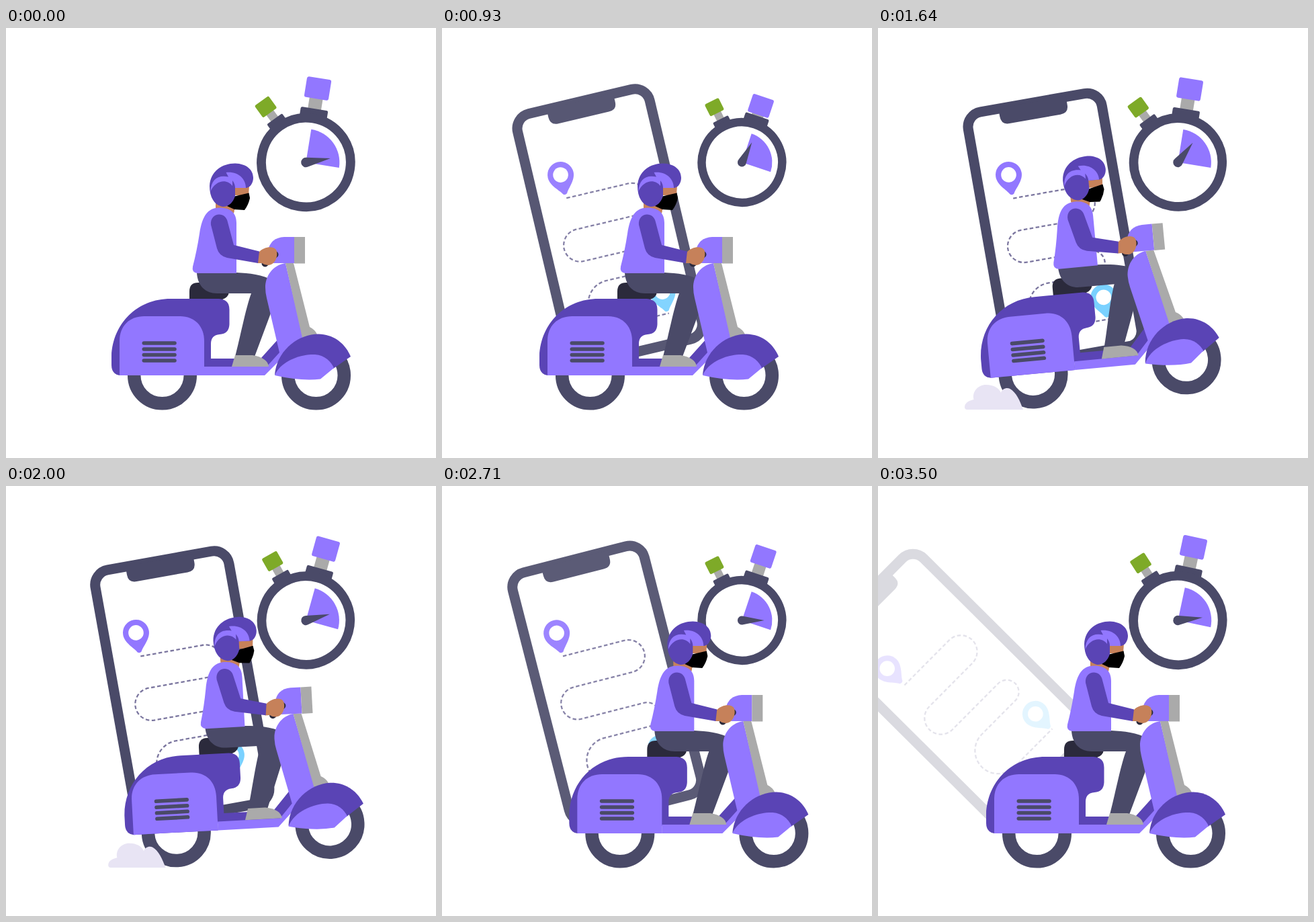
Write an HTML page that moves like this. It is 640 by 640 pixels and loops after 3.57 s.

```html
<!DOCTYPE html>
<html lang="en">
<head>
<meta charset="utf-8">
<title>Express delivery</title>
<style>
  html, body { margin: 0; width: 100%; height: 100%; overflow: hidden; background: #fff; }
  svg { display: block; width: 100%; height: 100%; }
  .light { fill: #9277ff; }
  .dark { fill: #5a44b5; }
  .slate { fill: #4a4a68; }
  .ink { fill: #2b2a3c; }
  .grey { fill: #aaa; }
  .skin { fill: #c6815a; }
  .line { fill: none; stroke: #4a4a68; }
</style>
</head>
<body>
<svg viewBox="0 0 640 640">
  <defs>
    <path id="drop" d="M-3-1.5C-7-9-19.5-18-19.5-30.5a19.5 19.5 0 0 1 39 0C19.5-18 7-9 3-1.5Q0 1-3-1.5Z"/>
  </defs>

  <g id="phone">
    <rect class="line" x="201" y="124.8" width="202" height="382" rx="22.5" stroke-width="15"/>
    <path class="slate" d="M250.5 124H352.500V137Q352.500 149.300 340 149.300H263Q250.500 149.300 250.500 137Z"/>
    <path d="M249 260H343.500a24.300 24.300 0 0 1 0 48.600H252.500a24.300 24.300 0 0 0 0 48.600H349a18 18 0 0 1 0 36H278a34.300 34.300 0 0 0 0 68.600H358"
      fill="none" stroke="#7b769f" stroke-width="2.300" stroke-dasharray="5.500 3.500"/>
    <g id="pin">
      <use href="#drop" class="light"/>
      <circle cy="-30.5" r="11.300" fill="#fff"/>
    </g>
    <g transform="translate(356 459)">
      <use href="#drop" fill="#7ad1ff"/>
      <circle cy="-30.5" r="11.300" fill="#fff"/>
    </g>
  </g>

  <g id="watch">
    <g transform="rotate(-45)">
      <rect class="grey" x="-6.5" y="-93" width="13" height="20"/>
      <rect x="-12.8" y="-113" width="25.600" height="22" rx="2.500" fill="#7eaa28"/>
      <rect class="slate" x="-14" y="-80" width="28" height="13" rx="2"/>
    </g>
    <rect class="grey" x="-10" y="-99" width="20" height="22"/>
    <rect id="cap" class="light" x="-18.3" y="-127" width="36.600" height="31" rx="3"/>
    <rect class="slate" x="-20.5" y="-81" width="41" height="16" rx="2.500"/>
    <circle class="line" r="66.400" stroke-width="13.800"/>
    <path class="light" d="M0 0V-50A50 50 0 0 1 50 0Z"/>
    <path id="hand" class="slate" d="M-6.900-2L0-37 6.900-2A7.200 7.200 0 1 1-6.900-2Z"/>
  </g>

  <g id="scooter">
    <g class="line" stroke-width="19.500">
      <circle cx="232.500" cy="517" r="41.800"/>
      <circle cx="461.500" cy="517" r="41.800"/>
    </g>
    <path class="ink" d="M273 404V392Q273 379 286 379H332V393Q331 401 322 404Z"/>
    <path class="dark" d="M169 517Q157 515 157 502V488C159 440 195 403 245 403H317Q332.500 404 332.500 419V441Q332 455 318 456Q305 457 305 470V492H379L406 462 412 482 390 506H295V517Z"/>
    <path class="light" d="M169 517V466C169 443 184 429 206 429H259C281 429 295 444 295 466V517Z"/>
    <path class="line" d="M205.300 469H251M205.300 478H251M205.300 486.500H251M205.300 495H251" stroke-width="5.600" stroke-linecap="round"/>

    <path class="slate" d="M284 364C285 384 297 395 314 395H365C357 416 348 463 341 489H370L398 414V376C382 367 362 365 343 364Z"/>
    <path class="light" d="M416 350C396 353 386 370 386 386Q386 394 388 402L407 483 388 504H295V517H385L442 460Z"/>
    <path class="grey" d="M416 350H428L452 445Q460 449 463 456L441 461Z"/>
    <path class="grey" d="M336 504L341 487H367C381 489 390 495 391 504Z"/>

    <path class="dark" d="M400 516C403 480 435 455.500 465 455.500C490 456 506 472 513 489L487 507Z"/>
    <path class="light" d="M400 517C409 495 440 485 460 486C475 487 484 497 488 506L468 522.500Q440 526 400 517Z"/>

    <path class="light" d="M390 331Q394 312 414 311H429V350H398Z"/>
    <rect class="grey" x="429" y="311" width="16" height="39.500"/>

    <path class="skin" d="M312 256V268L339 276 342 262Z"/>
    <path class="light" d="M278 355Q284 332 288 306C292 280 300 267.500 318 267.500C335 267.500 343 276 343 290V365H285Q276 364 278 355Z"/>
    <path d="M385.500 350.500L400.500 337" fill="none" stroke="#2b2a3c" stroke-width="10" stroke-linecap="round"/>
    <path class="skin" d="M376 334C384 325 398 324 402 330C406 338 401 353 390 353Q385 353 381 350H374Z"/>
    <path class="dark" d="M305 293C303 274 327 272 330 289L339 323 377 332.500 375 350 329 342Q317 339 314 328Z"/>

    <path class="skin" d="M339 234H362L361 249H337Z"/>
    <path d="M338 251L361.500 245.500 363 253Q361 263 355 271L340 270 329 265Z"/>
    <path class="dark" d="M303 235C304 213 322 201.500 341 201.500C358 202 368 211 368 223C368 230 364 237 358 238H341V250C338 260 331 266 323 266C310 264 303 252 303 235Z"/>
    <path class="light" d="M304.500 243C305 226 315 218 331 221.500L327.500 215C345 213 357 224 357 238H341C341 234 340 231 337 227V235C329 224 312 226 304.500 243Z"/>
  </g>

  <path id="dust" fill="#e8e4f4" d="M130.500 564C130.500 557 139 554 144 553C141 541 151 531 162 531C174 531 182 536 184.500 543C186 537 193 534.500 198 537C207 542 213 555 217.500 568H137C132 568.500 130.500 567 130.500 564Z"/>
</svg>

<script>
const STEPS = 50, STEP_MS = 71.4;

// Monotone cubic curve through [step, value] points, wrapping round the loop.
function curve(...pts) {
  const count = pts.length;
  const at = i => {
    const lap = Math.floor(i / count), [t, v] = pts[i - lap * count];
    return [t + lap * STEPS, v];
  };
  const slope = i => {
    const [t0, v0] = at(i), [t1, v1] = at(i + 1);
    return (v1 - v0) / (t1 - t0);
  };
  const tangent = i => {
    const a = slope(i - 1), b = slope(i);
    return a * b > 0 ? 2 * a * b / (a + b) : 0;
  };
  return n => {
    const i = pts.findLastIndex(p => p[0] <= n);
    const [t0, v0] = at(i), [t1, v1] = at(i + 1);
    const d = t1 - t0, u = (n - t0) / d, w = 1 - u;
    return v0 * w * w * (1 + 2 * u) + v1 * u * u * (3 - 2 * u)
      + d * u * w * (tangent(i) * w - tangent(i + 1) * u);
  };
}

const away = curve([0, 1], [6, .443], [8, .27], [13, .075], [16, .03], [23, 0], [32, .013], [40, .143], [42, .205], [49, .8]);
const pinSwing = curve([0, -40], [6, -25], [12, 0], [49, 0]);
const ride = curve([0, 0], [6, -6], [13, -12], [15, -12.5], [23, -1.5], [33, 38], [42, 24], [49, 4]);
const wheelie = curve([0, 0], [14, 0], [23, -5.3], [33, -.3], [35, 0]);
const puff = curve([0, 0], [15, 0], [20, 1], [23, 1], [33, .92], [37, 0]);
const watchTurn = curve([0, 9.1], [1, 9], [6, 18.5], [16, 18.5], [23, 9.2], [31, 18.5], [42, 18.5], [49, 12]);
const handTurn = curve([0, 71.4], [6, 8], [13, 8], [23, 28], [31, 71.4]);
const press = curve([0, 0], [10, 0], [13, 13], [16, 0]);

const el = id => document.getElementById(id);
const move = (id, value) => el(id).setAttribute('transform', value);

function draw(n) {
  const gone = away(n), x = ride(n), tilt = wheelie(n);
  move('phone', `rotate(${-10 - 44 * gone} 188 530)`);
  el('phone').setAttribute('opacity', 1 - gone);
  move('pin', `translate(248.500 254.800) rotate(${pinSwing(n)})`);

  const size = .95 + .05 * Math.cos((n - .5) * 4 * Math.PI / STEPS);
  move('watch', `translate(446.400 200) rotate(${watchTurn(n)}) scale(${size})`);
  move('cap', `translate(0 ${press(n)})`);
  move('hand', `rotate(${handTurn(n)})`);

  move('scooter', `translate(${x} ${tilt * .4}) rotate(${tilt} 232.500 517)`);
  move('dust', `translate(${x + 174} 568.500) scale(${puff(n)}) translate(-174 -568.500)`);
}

function tick() {
  draw(Math.floor(performance.now() / STEP_MS + .08) % STEPS);
  requestAnimationFrame(tick);
}
tick();
</script>
</body>
</html>
```
